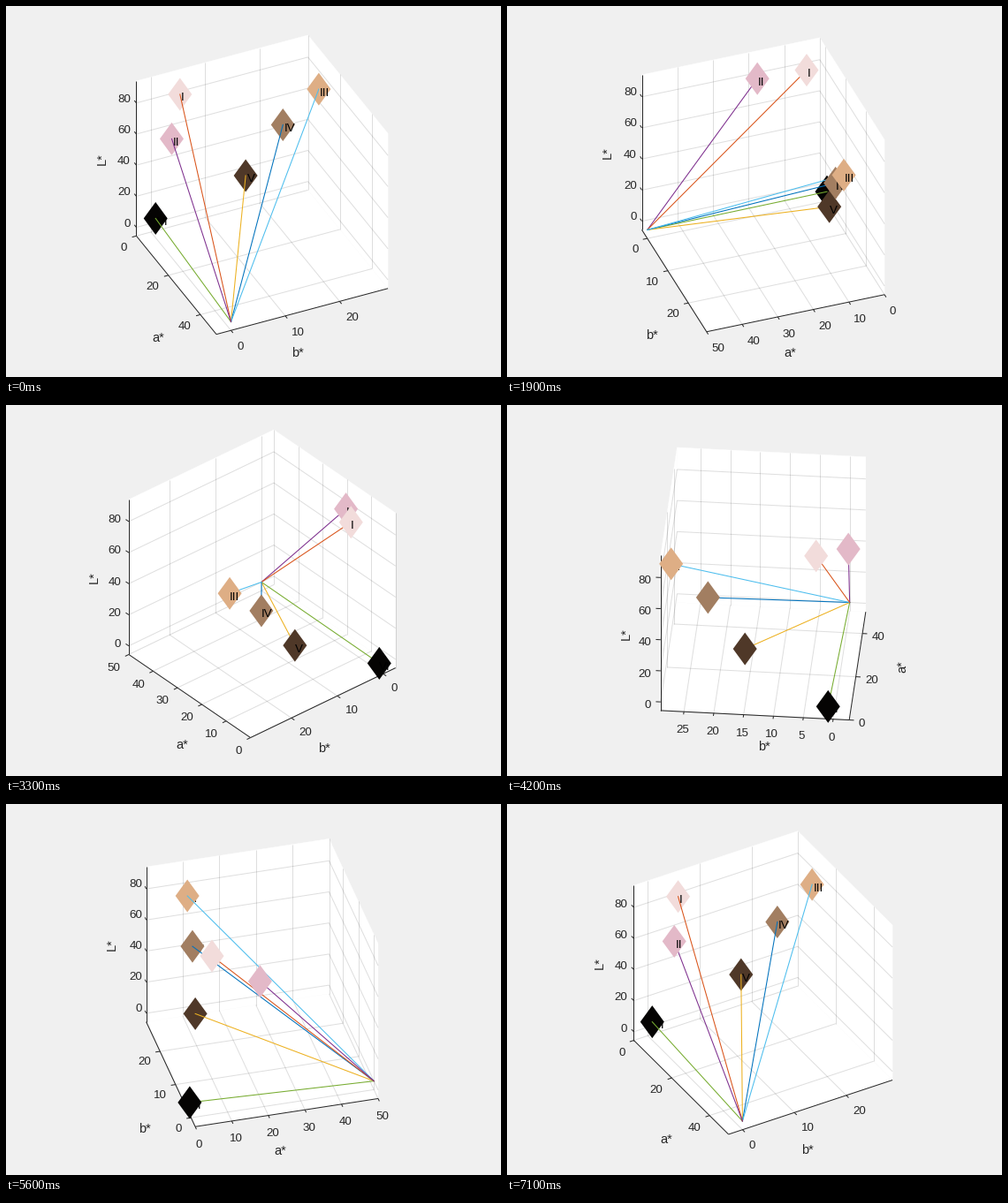
Write a matplotlib script that moves like this. It is 560 px wide and 420 px high and loops after 7200 ms.

```python
import numpy as np
import matplotlib.pyplot as plt
from matplotlib.animation import FuncAnimation
from matplotlib.collections import LineCollection

W, H, DPI = 560, 420, 100
PX = 72 / DPI                      # one pixel in points
CENTER = np.array([289.8, 202.3])
SIDE = 214.2                       # edge of the plot cube in pixels
SIN_EL, COS_EL = np.sin(np.radians(35)), np.cos(np.radians(35))
FRAMES, STEP, START_AZ = 72, 5, 65

LOW = np.array([0, -2.69, -5.53])
SPAN = np.array([50, 31.6, 99.7])
INK = "#262626"
GRID = (0.15, 0.15, 0.15, 0.15)

# label, (a, b, L), marker colour, line colour
SAMPLES = [
    ("I", (7.1, 3.25, 89.0), "#f2dcdb", "#d95319"),
    ("II", (18.2, -1.54, 78.9), "#e3b9c8", "#7e2f8e"),
    ("III", (10.75, 27.74, 74.1), "#deae85", "#4dbeee"),
    ("IV", (9.5, 21.5, 55.4), "#a27e61", "#0072bd"),
    ("V", (7.6, 15.2, 26.2), "#4f3828", "#edb120"),
    ("VI", (0.0, 0.85, 2.45), "#050403", "#77ac30"),
]
ORIGIN = (50, 0, 0)
TEXT_SHIFT = np.array([0.002, 0.0032, 0.001])
DIAMOND = np.array([(0, -18.5), (13.5, 0), (0, 18.5), (-13.5, 0)])

# distance of an axis title from its axis, by the axis' turn in degrees
TURN = [0, 5, 15, 30, 45, 60, 75, 80]
TITLE_DX = [0, -10, -7.5, -3.5, 4, 16.5, 29.5, 33]
TITLE_DY = [34, 35, 43, 48, 53, 58.5, 61.5, 62]

plt.rcParams["font.family"] = "Liberation Sans"
fig = plt.figure(figsize=(W / DPI, H / DPI), dpi=DPI, facecolor="#f0f0f0")
ax = fig.add_axes([0, 0, 1, 1])


def unit(p):
    """Data point to cube coordinates in -0.5..0.5."""
    return (np.array(p) - LOW) / SPAN - 0.5


class View:
    def __init__(self, az):
        self.sin, self.cos = np.sin(np.radians(az)), np.cos(np.radians(az))

    def vector(self, p):
        u, v, w = p
        x = u * self.cos + v * self.sin
        up = (v * self.cos - u * self.sin) * SIN_EL + w * COS_EL
        return SIDE * np.array([x, -up])

    def point(self, p):
        return CENTER + self.vector(p)

    def depth(self, p):
        u, v, w = p
        return (u * self.sin - v * self.cos) * COS_EL + w * SIN_EL


def text(x, y, s, size=13.33, color=INK, **kw):
    ax.text(x, y, s, fontsize=size * PX, color=color, va="baseline", **kw)


def title(x, y, s, upright=False):
    if upright:
        text(x + 5, y, s, 14.67, ha="center", rotation=90,
             rotation_mode="anchor")
    else:
        text(x, y + 5, s, 14.67, ha="center")


def segments(segs, color, z):
    ax.add_collection(LineCollection(segs, colors=[color], linewidths=PX,
                                     capstyle="butt", zorder=z))


def edge_point(axis, t, fixed):
    """Cube point at t along an axis; fixed gives the other coordinates."""
    p = np.array(fixed, float)
    p[axis] = t
    return p


def tick_values(axis, turn):
    if axis == 0:
        step = 20 if turn > 57.5 else 10
    elif axis == 1:
        step = 5 if turn < 20 else 10
    else:
        step = 20
    first = int(np.ceil(LOW[axis] / step)) * step
    return range(first, int(LOW[axis] + SPAN[axis]) + 1, step)


def draw_axis(view, axis, fixed, out, turn, name):
    """Axis line with ticks, numbers and title; out points off the box."""
    ends = [view.point(edge_point(axis, t, fixed)) for t in (-0.5, 0.5)]
    lines = [ends]
    tick = view.vector(0.025 * np.array(out))
    way = tick / np.hypot(*tick)
    for val in tick_values(axis, turn):
        t = (val - LOW[axis]) / SPAN[axis] - 0.5
        p = view.point(edge_point(axis, t, fixed))
        lines.append([p, p + tick])
        x, y = p + 10.5 * way
        beside = axis == 2 or abs(way[1]) < 0.08
        if axis == 2:
            ha = "right"
        elif abs(way[0]) < 0.5:
            ha = "center"
        else:
            ha = "left" if way[0] > 0 else "right"
        text(x, y + (7.2 if beside else 13.8), str(val), ha=ha)
    segments(lines, INK, -8)

    mx, my = (ends[0] + ends[1]) / 2
    side = np.sign(way[0])
    if axis == 2:
        title(mx - 39.9, my + 0.5, name, True)
    elif turn > 82:
        title(mx + side * 49.5, my + 0.5, name, True)
    else:
        title(mx + side * np.interp(turn, TURN, TITLE_DX),
              my + np.interp(turn, TURN, TITLE_DY), name)


def draw_box(view, back_u, back_v, turns):
    h = 0.5
    faces = [
        [(-h, -h, -h), (h, -h, -h), (h, h, -h), (-h, h, -h)],
        [(back_u, -h, -h), (back_u, h, -h), (back_u, h, h), (back_u, -h, h)],
        [(-h, back_v, -h), (h, back_v, -h), (h, back_v, h), (-h, back_v, h)],
    ]
    for face in faces:
        ax.fill(*np.array([view.point(p) for p in face]).T, color="white",
                lw=0.3, zorder=-10)

    grid = []
    for axis in range(3):
        for val in tick_values(axis, turns[axis]):
            t = (val - LOW[axis]) / SPAN[axis] - 0.5
            corner = edge_point(axis, t, (back_u, back_v, -h))
            for other in {0, 1, 2} - {axis}:
                grid.append([view.point(edge_point(other, e, corner))
                             for e in (-h, h)])
    segments(grid, GRID, -9)


def draw_samples(view):
    start = unit(ORIGIN)
    for name, data, fill, stroke in SAMPLES:
        p = unit(data)
        x, y = view.point(p)
        ax.fill(*(DIAMOND + (x, y)).T, color=fill, lw=0,
                zorder=view.depth(p))
        ax.plot(*np.array([view.point(start), (x, y)]).T, color=stroke,
                lw=PX * 1.05, zorder=view.depth((start + p) / 2))
        q = p + TEXT_SHIFT
        tx, ty = view.point(q)
        text(tx + 0.5, ty + 7.6, name, color="black", ha="left",
             zorder=view.depth(q))


def draw(i):
    ax.clear()
    ax.set(xlim=(0, W), ylim=(H, 0))
    ax.axis("off")

    view = View(START_AZ + STEP * i)
    su = 1 if view.sin > 0 else -1
    sv = 1 if view.cos < 0 else -1
    front_u, front_v = su / 2, sv / 2
    turn = np.degrees(np.arctan2(abs(view.sin), abs(view.cos)))
    turns = (turn, 90 - turn, 0)

    draw_box(view, -front_u, -front_v, turns)
    draw_axis(view, 0, (0, front_v, -0.5), (0, sv, 0), turns[0], "a*")
    draw_axis(view, 1, (front_u, 0, -0.5), (su, 0, 0), turns[1], "b*")
    # the vertical axis stands on the leftmost edge, its ticks lean upwards
    left_u, left_v = sv, -su
    out = (left_u, 0, 0) if su != sv else (0, left_v, 0)
    draw_axis(view, 2, (left_u / 2, left_v / 2, 0), out, 0, "L*")
    draw_samples(view)
    return []


anim = FuncAnimation(fig, draw, frames=FRAMES, init_func=lambda: [],
                     interval=100, repeat=True, repeat_delay=0)
plt.show()
```
